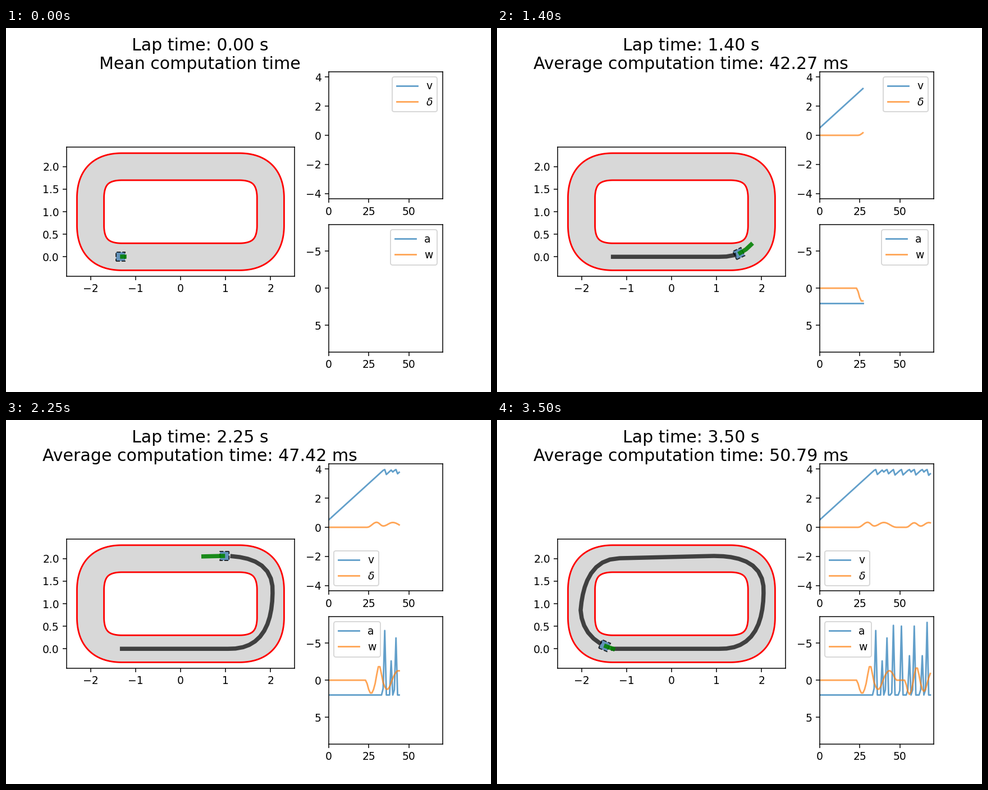
Recreate the animation shown at these times as a matplotlib script. Size 864x648 px, loop 3550 ms.

```python
from itertools import cycle

import numpy as np
import matplotlib.pyplot as plt
from matplotlib.animation import FuncAnimation
from matplotlib.patches import Polygon, Rectangle
from matplotlib.transforms import Affine2D

plt.rcParams["font.family"] = "DejaVu Sans"
N_FRAMES, DT, HORIZON = 71, 0.05, 2
N_STATES = N_FRAMES + HORIZON
TOP_SPEED, BRAKE_SPEED, MAX_ACC = 3.955, 3.91, 2.0
BEND_X, LANE = 1.3, 0.3
CAR, CAR_LAG = 0.2, 0.035


def bezier(ctrl, n=60):
    """Points and tangents of a quadratic curve."""
    a, b, c = np.array(ctrl, float)
    t = np.linspace(0, 1, n)[:, None]
    pts = (1 - t)**2 * a + 2 * t * (1 - t) * b + t**2 * c
    return pts, 2 * (1 - t) * (b - a) + 2 * t * (c - b)


def border(offset):
    """Track edge: the centre line moved sideways, outwards if positive."""
    bends = [[(1.3, 0), (2, 0), (2, 0.7)], [(2, 1.3), (2, 2), (1.3, 2)],
             [(-1.3, 2), (-2, 2), (-2, 1.3)], [(-2, 0.7), (-2, 0), (-1.3, 0)]]
    edge = []
    for bend in bends:
        pts, tan = bezier(bend)
        normal = np.column_stack([tan[:, 1], -tan[:, 0]])
        edge.append(pts + offset * normal / np.hypot(*tan.T)[:, None])
    return np.vstack(edge)


# Driven line: four bends joined by straights
driven = [[(1.1, 0), (2.03, 0), (2.045, 1.25)],
          [(2.045, 1.25), (2.08, 2.08), (0.9, 2.06)],
          [(-1.15, 2.01), (-1.93, 2.0), (-2.02, 0.85)],
          [(-2.02, 0.85), (-1.97, 0.2), (-1.3, 0)]]
line = np.vstack([[(-1.3, 0)]] + [bezier(bend)[0] for bend in driven])
arc = np.concatenate([[0], np.cumsum(np.hypot(*np.diff(line, axis=0).T))])


def point_at(s):
    return np.array([np.interp(s, arc, line[:, i]) for i in (0, 1)])


def drive():
    """Speed up to the limit, brake for one step, repeat."""
    brakes = cycle((6.7, 2.6, 5.7, 7.4, 7.3, 3.3, 7.3, 3.3, 7.8))
    speed, acc, dist = np.full(N_STATES, 0.5), np.zeros(N_STATES), np.zeros(N_STATES)
    for i in range(N_STATES):
        if speed[i] > BRAKE_SPEED:
            acc[i] = -next(brakes)
        else:
            acc[i] = min(MAX_ACC, (TOP_SPEED - speed[i]) / DT)
        if i + 1 < N_STATES:
            speed[i + 1] = speed[i] + DT * acc[i]
            grip = 1.11 if abs(point_at(dist[i])[0]) < BEND_X else 0.91
            dist[i + 1] = min(dist[i] + DT * speed[i] * grip, arc[-1])
    return speed, acc, dist


def ease_between(x, knots):
    """Cosine easing through (position, value) knots."""
    pos, val = np.array(knots, float).T
    i = np.clip(np.searchsorted(pos, x, side="right") - 1, 0, len(pos) - 2)
    u = np.clip((x - pos[i]) / (pos[i + 1] - pos[i]), 0, 1)
    return val[i] + (val[i + 1] - val[i]) * (1 - np.cos(np.pi * u)) / 2


speed, acc, dist = drive()
states = point_at(dist)
angle = ease_between(np.arange(N_STATES + 1),
                     [(24, 0), (30, 0.345), (34, 0.088), (40, 0.33), (48, 0), (54, 0),
                      (59, 0.31), (63, 0.08), (68, 0.325), (75, 0)])
rate = np.diff(angle) / DT

fig = plt.figure(figsize=(6.4, 4.8), dpi=135, facecolor="white")
grid = fig.add_gridspec(2, 2, width_ratios=[2, 1], bottom=0.11023, top=0.88023)
track_ax = fig.add_subplot(grid[:, 0])
state_ax = fig.add_subplot(grid[0, 1])
input_ax = fig.add_subplot(grid[1, 1])

title = fig.text(0.4, 0.9742, "", size=16, ha="center", va="top")

track_ax.set_aspect("equal")
track_ax.set(xlim=(-2.53, 2.53), ylim=(-0.43, 2.43))
for offset, fill in ((LANE, "#d8d8d8"), (-LANE, "white")):
    track_ax.add_patch(Polygon(border(offset), fc=fill, ec="red", lw=1.5, zorder=0.5))
car = Rectangle((-CAR / 2, -CAR / 2), CAR, CAR, fc="steelblue", ec="black",
                ls="--", lw=1, alpha=0.8)
track_ax.add_patch(car)
trail, = track_ax.plot([], [], color="black", lw=4, alpha=0.7)
plan, = track_ax.plot([], [], color="green", lw=4, alpha=0.88)


def chart(ax, labels, ylim):
    ax.set(xlim=(0, N_FRAMES), ylim=ylim)
    curves = [ax.plot([], [], alpha=0.7, label=name)[0] for name in labels]
    ax.legend(loc="best")
    return curves


curves = (chart(state_ax, ("v", r"$\delta$"), (-4.365, 4.365))
          + chart(input_ax, ("a", "w"), (8.6, -8.6)))
series = (speed, angle, acc, rate)
mean_keys = np.array([(1, 48), (10, 40.61), (20, 33.83), (35, 49.65),
                      (45, 47.42), (54, 45.78), (70, 50.79)])


def update(k):
    if k:
        mean = np.interp(k, *mean_keys.T)
        second = f"Average computation time: {mean:.2f} ms"
    else:
        second = "Mean computation time"
    title.set_text(f"Lap time: {k * DT:.2f} s\n{second}")

    trail.set_data(states[:, :k])
    plan.set_data(states[:, k:k + HORIZON + 1])
    s = np.clip(dist[k], 0.03, arc[-1] - 0.03)
    dx, dy = point_at(s + 0.03) - point_at(s - 0.03)
    pose = Affine2D().translate(-CAR_LAG, 0).rotate(np.arctan2(dy, dx))
    car.set_transform(pose.translate(*states[:, k]) + track_ax.transData)

    for curve, values in zip(curves, series):
        curve.set_data(np.arange(k), values[:k])
    return [title, trail, plan, car, *curves]


anim = FuncAnimation(fig, update, frames=N_FRAMES, interval=50,
                     repeat=True, repeat_delay=0, blit=False)
plt.show()
```
